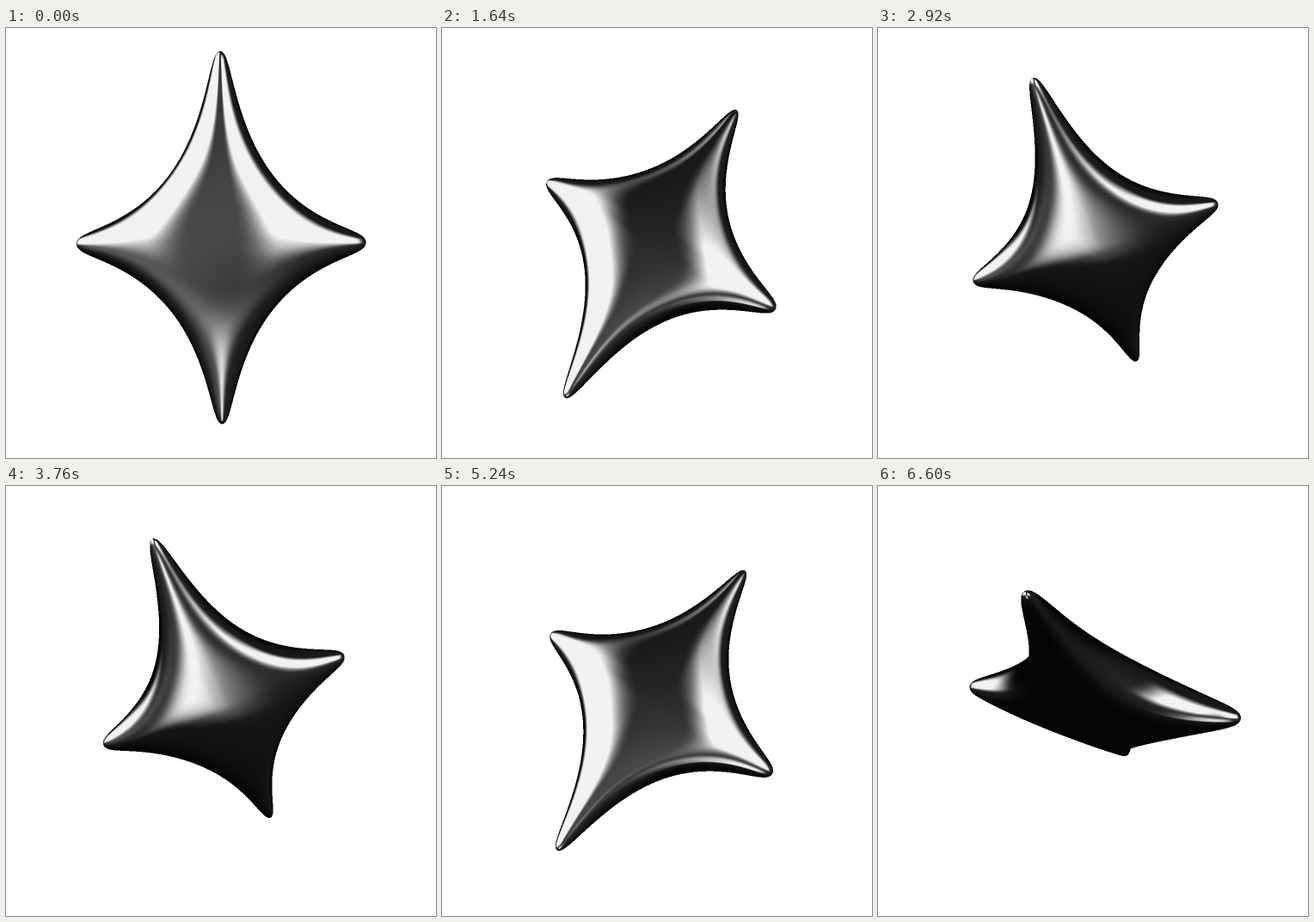
Animation of 500x500 px, one loop 6640 ms. Source, as an HTML page with a canvas:

```html
<!DOCTYPE html>
<html lang="en">
<head>
<meta charset="utf-8">
<title>Chrome star</title>
<style>
  html, body { margin: 0; width: 100%; height: 100%; overflow: hidden; background: #fff; }
  canvas { display: block; width: 500px; height: 500px; }
</style>
</head>
<body>
<canvas id="stage" width="500" height="500"></canvas>
<script>
const LOOP = 6640, STEP = 40, TURN = 3410;
const SIZE = 1000, DEPTH = 540;
const A = 168, B = 217, DOME = 41;        // half width, half height, thickness cap
const P = 0.4, SOFT = 0.045;              // concavity of the sides, roundness of the ridge
const BLUNT = 16, CUT = 1 - 1.08 ** -BLUNT; // rounding of the tips
const RINGS = 32, SPOKES = 208;

// time, angle of the long arm, its tilt, roll around it, scale
const KEYS = [
  [0, 90.3, 4.4, 0, 1],
  [100, 98, 30, 18, 0.995],
  [220, 122, 63, 42, 0.98],
  [400, 166, 62, 35, 0.973],
  [500, 208, 54, 20, 0.968],
  [600, 226, 35, 2, 0.962],
  [720, 235.2, 16, -9.6, 0.955],
  [1580, 236.1, 10.5, -8.2, 0.913],
  [1720, 253, 16, -6, 0.908],
  [1820, 300, 23, -3, 0.904],
  [1920, 373, 27, -1, 0.9],
  [2020, 427, 30, 0, 0.896],
  [2120, 449.2, 31, 1, 0.89],
  [2380, 456.7, 30.5, 1.9, 0.89],
  [2920, 470.1, 28.3, 4.8, 0.89],
  [3410, 477, 27.3, 6, 0.89]
];

function slope(i, c) {
  const a = KEYS[i - 1], b = KEYS[i + 1];
  return a && b ? (b[c] - a[c]) / (b[0] - a[0]) : 0;
}

function poseAt(t) {
  let i = 0;
  while (i < KEYS.length - 2 && t > KEYS[i + 1][0]) i++;
  const a = KEYS[i], b = KEYS[i + 1], d = b[0] - a[0], s = (t - a[0]) / d;
  const s2 = s * s, s3 = s2 * s;
  return [1, 2, 3, 4].map(c =>
    a[c] * (2 * s3 - 3 * s2 + 1) + b[c] * (3 * s2 - 2 * s3) +
    d * (slope(i, c) * (s3 - 2 * s2 + s) + slope(i + 1, c) * (s3 - s2)));
}

// Outline: curve(x / A) + curve(y / B) = 1, with the ends blunted
const low = SOFT ** P, span = (1 + SOFT * SOFT) ** (P / 2) - low;

function curve(v) {
  const open = Math.max(1 - CUT * v ** BLUNT, 0.02);
  const w = v * ((1 - CUT) / open) ** (1 / BLUNT);
  return ((w * w + SOFT * SOFT) ** (P / 2) - low) / span;
}

function inverseSq(c) {
  const w2 = Math.max(c * span + low, 0) ** (2 / P) - SOFT * SOFT;
  return w2 * (1 - CUT + CUT * w2 ** (BLUNT / 2)) ** (-2 / BLUNT);
}
const inverse = c => Math.sqrt(Math.max(inverseSq(c), 0));

// Squared half thickness of the inflated body
function bulge(x, y) {
  const a = B * B * inverseSq(1 - curve(x / A)) - y * y;
  const b = A * A * inverseSq(1 - curve(y / B)) - x * x;
  return a * b / (a + b + a * b / (DOME * DOME) || 1e-9);
}

const points = [], faces = [];
function buildSide(side) {
  const base = points.length;
  for (let i = 0; i <= RINGS; i++) {
    const s = Math.sin(i / RINGS * Math.PI / 2);
    for (let j = 0; j < SPOKES; j++) {
      const phi = j / SPOKES * 2 * Math.PI, c = Math.cos(phi), n = Math.sin(phi);
      const x = s * A * Math.sign(c) * inverse(c * c);
      const y = s * B * Math.sign(n) * inverse(n * n);
      const z = i === RINGS ? 0 : side * Math.sqrt(Math.max(bulge(x, y), 0));
      const e = 0.4;
      const nx = (bulge(x - e, y) - bulge(x + e, y)) / (2 * e);
      const ny = (bulge(x, y - e) - bulge(x, y + e)) / (2 * e);
      const nz = 2 * z;
      const len = Math.hypot(nx, ny, nz) || 1;
      points.push([x, y, z, nx / len, ny / len, nz / len]);
      if (i < RINGS) {
        const p = base + i * SPOKES + j, q = base + i * SPOKES + (j + 1) % SPOKES;
        faces.push([p, q, p + SPOKES], [q, q + SPOKES, p + SPOKES]);
      }
    }
  }
}
buildSide(1);
buildSide(-1);

// Studio reflection by view normal
const ease = (a, b, v) => {
  const s = Math.min(1, Math.max(0, (v - a) / (b - a)));
  return s * s * (3 - 2 * s);
};
const band = (v, a, b, c, d) => ease(a, b, v) * (1 - ease(c, d, v));
const glow = (x, y, cx, cy, sx, sy) =>
  Math.exp(-(((x - cx) / sx) ** 2 + ((y - cy) / sy) ** 2) / 2);

function reflect(x, y) {
  const left = 225 * band(x, -0.88, -0.66, -0.19, -0.07) * band(y, -0.2, 0.06, 0.45, 0.72);
  const right = 222 * band(x, 0.04, 0.14, 0.32, 0.56) * band(y, -0.2, 0.02, 0.2, 0.44);
  const strip = 215 * glow(x, 0, 0, 0, 0.09, 1) * band(y, -0.5, -0.42, -0.32, -0.16);
  const haze = 46 * glow(x, y, 0, -0.02, 0.35, 0.17) + 45 * glow(x, y, -0.28, -0.22, 0.14, 0.1);
  const dark = 20 * ease(-0.85, -0.35, y);
  const rim = 1 - ease(0.74, 0.95, Math.hypot(x, y));
  return Math.min(242, (dark + haze + left + right + strip) * rim + 4);
}

const MAP = 512, HALF = (MAP - 1) / 2, shade = new Uint32Array(MAP * MAP);
for (let j = 0; j < MAP; j++) for (let i = 0; i < MAP; i++) {
  const g = Math.round(reflect(i / HALF - 1, j / HALF - 1));
  shade[j * MAP + i] = (255 << 24 | g << 16 | g << 8 | g) >>> 0;
}

const ctx = document.getElementById('stage').getContext('2d');
ctx.imageSmoothingQuality = 'high';
const buffer = document.createElement('canvas');
buffer.width = buffer.height = SIZE;
const bctx = buffer.getContext('2d');
const image = bctx.createImageData(SIZE, SIZE);
const pixels = new Uint32Array(image.data.buffer);
const depth = new Float32Array(SIZE * SIZE);
const view = points.map(() => new Float64Array(6));

function axes(angle, tilt, roll) {
  const rad = Math.PI / 180;
  const ca = Math.cos(angle * rad), sa = Math.sin(angle * rad);
  const ct = Math.cos(tilt * rad), st = Math.sin(tilt * rad);
  const cr = Math.cos(roll * rad), sr = Math.sin(roll * rad);
  const up = [ca * ct, sa * ct, st];
  const side = [sa, -ca, 0], face = [-ca * st, -sa * st, ct];
  return [
    side.map((v, i) => v * cr + face[i] * sr),
    up,
    face.map((v, i) => v * cr - side[i] * sr)
  ];
}

function project([angle, tilt, roll, scale]) {
  const [u, v, w] = axes(angle, tilt, roll);
  const turn = (x, y, z, i) => x * u[i] + y * v[i] + z * w[i];
  points.forEach(([x, y, z, nx, ny, nz], n) => {
    const o = view[n], pz = scale * turn(x, y, z, 2);
    const m = 2 * scale * DEPTH / (DEPTH - pz);
    o[0] = SIZE / 2 + m * turn(x, y, z, 0);
    o[1] = SIZE / 2 - m * turn(x, y, z, 1);
    o[2] = pz;
    o[3] = (turn(nx, ny, nz, 0) + 1) * HALF;
    o[4] = (turn(nx, ny, nz, 1) + 1) * HALF;
    o[5] = turn(nx, ny, nz, 2);
  });
}

function fill(a, b, c) {
  const ax = a[0], ay = a[1];
  const bx = b[0] - ax, by = b[1] - ay, cx = c[0] - ax, cy = c[1] - ay;
  const area = bx * cy - by * cx;
  if (Math.abs(area) < 1e-7) return;
  const x0 = Math.max(0, Math.ceil(Math.min(ax, b[0], c[0])));
  const x1 = Math.min(SIZE - 1, Math.floor(Math.max(ax, b[0], c[0])));
  const y0 = Math.max(0, Math.ceil(Math.min(ay, b[1], c[1])));
  const y1 = Math.min(SIZE - 1, Math.floor(Math.max(ay, b[1], c[1])));
  for (let y = y0; y <= y1; y++) for (let x = x0; x <= x1; x++) {
    const dx = x - ax, dy = y - ay;
    const q = (dx * cy - dy * cx) / area, r = (bx * dy - by * dx) / area, p = 1 - q - r;
    if (q < -1e-6 || r < -1e-6 || p < -1e-6) continue;
    const k = y * SIZE + x, z = p * a[2] + q * b[2] + r * c[2];
    if (z <= depth[k]) continue;
    depth[k] = z;
    const i = p * a[3] + q * b[3] + r * c[3], j = p * a[4] + q * b[4] + r * c[4];
    pixels[k] = shade[(j + 0.5 | 0) * MAP + (i + 0.5 | 0)];
  }
}

function render(t) {
  project(poseAt(t <= TURN ? t : 2 * TURN - t));
  pixels.fill(0xffffffff);
  depth.fill(-1e6);
  for (const [i, j, k] of faces) {
    const a = view[i], b = view[j], c = view[k];
    if (Math.max(a[5], b[5], c[5]) > -0.45) fill(a, b, c);
  }
  bctx.putImageData(image, 0, 0);
  ctx.drawImage(buffer, 0, 0, 500, 500);
}

const start = performance.now();
let shown = -1;
function tick() {
  const t = Math.floor((performance.now() - start) % LOOP / STEP) * STEP;
  if (t !== shown) render(shown = t);
  requestAnimationFrame(tick);
}
tick();
</script>
</body>
</html>
```
